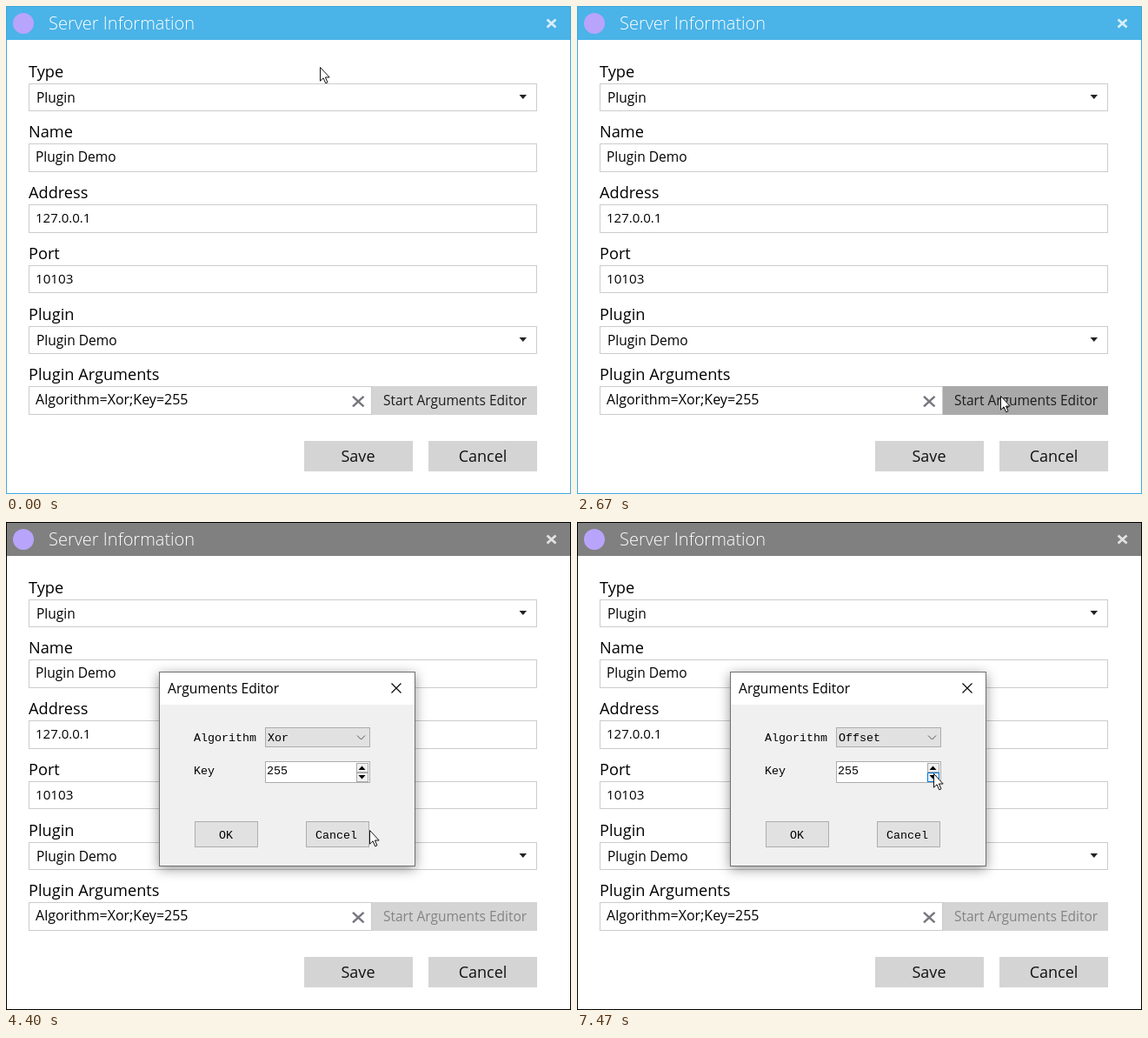
These frames come from a looping animation (650x561 px, 8000 ms). An HTML page:

```html
<!DOCTYPE html>
<html lang="en">
<head>
<meta charset="utf-8">
<title>Server Information</title>
<style>
  html, body { margin: 0; width: 100%; height: 100%; overflow: hidden; background: #fff; }
  svg { display: block; font-family: "Open Sans", "Noto Sans", sans-serif; }
  text { white-space: pre; }
  .mono { font-family: "Liberation Mono", monospace; }
  .dialog { filter: drop-shadow(0 3px 7px rgba(0, 0, 0, .42)); }
</style>
</head>
<body>
<svg id="stage" width="650" height="561" viewBox="0 0 650 561"></svg>
<script>
const LOOP = 8000, TICK = 1000 / 15;
const stage = document.getElementById('stage');

// Pointer positions as [tick, x, y], joined by straight moves.
const pointerPath = [
  [6, 361, 70], [19, 361, 379], [21, 362, 387], [32, 456, 444], [38, 512, 446],
  [39, 512, 446], [40, 487, 448], [62, 487, 448], [66, 418, 354], [75, 366, 268],
  [79, 343, 255], [82, 343, 255], [88, 336, 268], [90, 336, 271], [93, 336, 271],
  [95, 337, 279], [99, 337, 279], [112, 410, 289]
];

const clamp = v => Math.max(0, Math.min(1, v));

function pointerAt(tick) {
  const next = pointerPath.findIndex(p => p[0] >= tick);
  if (next === 0) return pointerPath[0].slice(1);
  if (next < 0) return pointerPath.at(-1).slice(1);
  const [t0, x0, y0] = pointerPath[next - 1], [t1, x1, y1] = pointerPath[next];
  const p = (tick - t0) / (t1 - t0);
  return [Math.round(x0 + (x1 - x0) * p), Math.round(y0 + (y1 - y0) * p)];
}

const inside = ([px, py], x, y, right, bottom) => px >= x && px < right && py >= y && py < bottom;

const rect = (x, y, right, bottom, fill) =>
  `<rect x="${x}" y="${y}" width="${right - x}" height="${bottom - y}" fill="${fill}"/>`;

const frame = (x, y, right, bottom, fill, stroke) =>
  `<rect x="${x + .5}" y="${y + .5}" width="${right - x - 1}" height="${bottom - y - 1}" fill="${fill}" stroke="${stroke}"/>`;

const text = (x, y, size, content, fill = '#000', extra = '') =>
  `<text x="${x}" y="${y}" font-size="${size}" fill="${fill}" ${extra}>${content}</text>`;

const mono = (x, y, content, fill = '#000') => text(x, y, 13.33, content, fill, 'class="mono"');

const shape = (d, fill) => `<path d="${d}" fill="${fill}"/>`;

const line = (d, stroke, width = 1) =>
  `<path d="${d}" fill="none" stroke="${stroke}" stroke-width="${width}"/>`;

const cross = (x, y, w, h, stroke, width) =>
  line(`M${x} ${y}l${w} ${h}m0 ${-h}l${-w} ${h}`, stroke, width);

function field(pointer, label, y, value, { combo = false, right = 611, size = 15.5, height = 33 } = {}) {
  const bottom = y + (combo ? 32 : height);
  const hover = pointer && inside(pointer, 26, y, right, bottom);
  return text(26, y - 7, 18.2, label) +
    frame(26, y, right, bottom, hover && combo ? '#e9e9e9' : '#fff', hover ? '#7e7e7e' : '#ccc') +
    text(combo ? 35 : 34, y + (combo ? 22 : 21), size, value) +
    (combo ? shape(`M590.5 ${y + 13}h8.5l-4.2 5z`, '#222') : '');
}

function startButton(tick, pointer) {
  const disabled = tick >= 50;
  const hover = inside(pointer, 421, 437, 611, 470);
  let fill = '#d4d4d4';
  if (!disabled && hover) fill = tick >= 45 && tick < 49 ? '#787878' : '#a9a9a9';
  return rect(421, 437, 611, 470, fill) +
    text(434, 459, 15.5, 'Start Arguments Editor', disabled ? '#838383' : '#1c1c1c');
}

function mainWindow(tick, pointer) {
  const active = tick < 53;
  const bar = active ? '#4ab3e8' : '#808080';
  const target = active ? pointer : null;
  return frame(0, 0, 650, 561, '#fff', active ? '#3fa9de' : '#000') +
    rect(1, 1, 649, 39, bar) +
    '<circle cx="20" cy="20" r="12" fill="#b8a4fb"/>' +
    text(49, 27, 20, 'Server Information', '#fff', 'font-weight="300"') +
    cross(622.5, 15.5, 10, 9, active ? '#d9eefa' : '#e2e2e2', 2.8) +
    field(target, 'Type', 89, 'Plugin', { combo: true }) +
    field(target, 'Name', 158, 'Plugin Demo') +
    field(target, 'Address', 228, '127.0.0.1', { size: 15 }) +
    field(target, 'Port', 298, '10103', { size: 15.2, height: 32 }) +
    field(target, 'Plugin', 368, 'Plugin Demo', { combo: true }) +
    field(target, 'Plugin Arguments', 437, 'Algorithm=Xor;Key=255', { right: 421, size: 16 }) +
    cross(399, 448.8, 12.5, 11.5, '#77777f', 2.5) +
    startButton(tick, pointer) +
    rect(343, 500, 468, 535, '#d4d4d4') + rect(486, 500, 611, 535, '#d4d4d4') +
    text(405, 524, 18, 'Save', '#111', 'text-anchor="middle"') +
    text(548.5, 524, 18, 'Cancel', '#111', 'text-anchor="middle"');
}

function dropDown(tick) {
  if (tick < 82 || tick >= 100) return '';
  const open = Math.min(31, 6 + (tick - 82) * 19);
  const selected = tick < 95 ? 0 : 1;
  const item = (name, i) => {
    const y = 260 + 15 * i, chosen = i === selected;
    return rect(299, y, 417, y + 15, chosen ? '#0078d7' : '#fff') +
      mono(301, y + 12, name, chosen ? '#fff' : '#000');
  };
  return '<clipPath id="below"><rect x="290" y="259" width="140" height="60"/></clipPath>' +
    `<rect x="304" y="265" width="118" height="${open - 2}" fill="#000" opacity=".22"/>` +
    `<g clip-path="url(#below)"><g transform="translate(0 ${open - 31})">` +
    rect(298, 259, 418, 290, '#fff') + ['Xor', 'Offset'].map(item).join('') +
    line('M298.5 259v31M417.5 259v31', '#000') +
    (open === 31 ? line('M298 290h120', '#000') : '') + '</g></g>';
}

function spinButton(pointer, y, triangle) {
  const hover = inside(pointer, 403, y, 417, y + 11);
  return frame(403, y, 417, y + 11, hover ? '#e5f1fb' : '#f0f0f0', hover ? '#0078d7' : '#adadad') +
    shape(triangle, '#000');
}

function pushButton(x, label, labelX) {
  return frame(x, 344, x + 73, 374, '#e1e1e1', '#adadad') + mono(labelX, 363.5, label);
}

function dialog(tick, pointer) {
  if (tick < 53) return '';
  const shown = 1 - (1 - clamp((tick - 52) / 5)) ** 2;
  const scale = .9 + .1 * shown;
  const hot = tick < 100 && (tick >= 82 || inside(pointer, 298, 236, 419, 259));
  return `<g class="dialog" opacity="${shown}" transform="translate(323.5 284) scale(${scale}) translate(-323.5 -284)">` +
    frame(176, 172, 471, 396, '#f0f0f0', '#707070') +
    rect(177, 173, 470, 210, '#fff') +
    text(186, 197, 15.7, 'Arguments Editor') +
    cross(443.5, 185.5, 11, 11, '#000', 1.1) +
    mono(216, 251.5, 'Algorithm') + mono(216, 290, 'Key') +
    frame(298, 236, 419, 259, hot ? '#e5f1fb' : '#e1e1e1', hot ? '#0078d7' : '#adadad') +
    mono(301, 252, tick < 100 ? 'Xor' : 'Offset') +
    line('M404 245.5l4.5 4.5l4.5 -4.5', '#555') +
    frame(298, 275, 419, 300, '#fff', '#adadad') +
    mono(300, 290, '255') +
    spinButton(pointer, 277, 'M405.5 285h8l-4 -4.5z') +
    spinButton(pointer, 288, 'M405.5 291h8l-4 4.5z') +
    pushButton(217, 'OK', 245) + pushButton(345, 'Cancel', 356) +
    '</g>' + dropDown(tick);
}

const arrow = ([x, y]) =>
  `<path transform="translate(${x} ${y})" d="M.5 .5V16.2L4.1 12.8L6.7 18.8L9 17.8L6.4 12H11.2Z" fill="#fff" stroke="#111"/>`;

let drawn = -1;
function draw(now) {
  const tick = Math.floor((now % LOOP + 4) / TICK) % Math.round(LOOP / TICK);
  if (tick !== drawn) {
    drawn = tick;
    const pointer = pointerAt(tick);
    stage.innerHTML = mainWindow(tick, pointer) + dialog(tick, pointer) + arrow(pointer);
  }
}

const start = performance.now();
function loop() {
  draw(performance.now() - start);
  requestAnimationFrame(loop);
}
loop();
</script>
</body>
</html>
```
